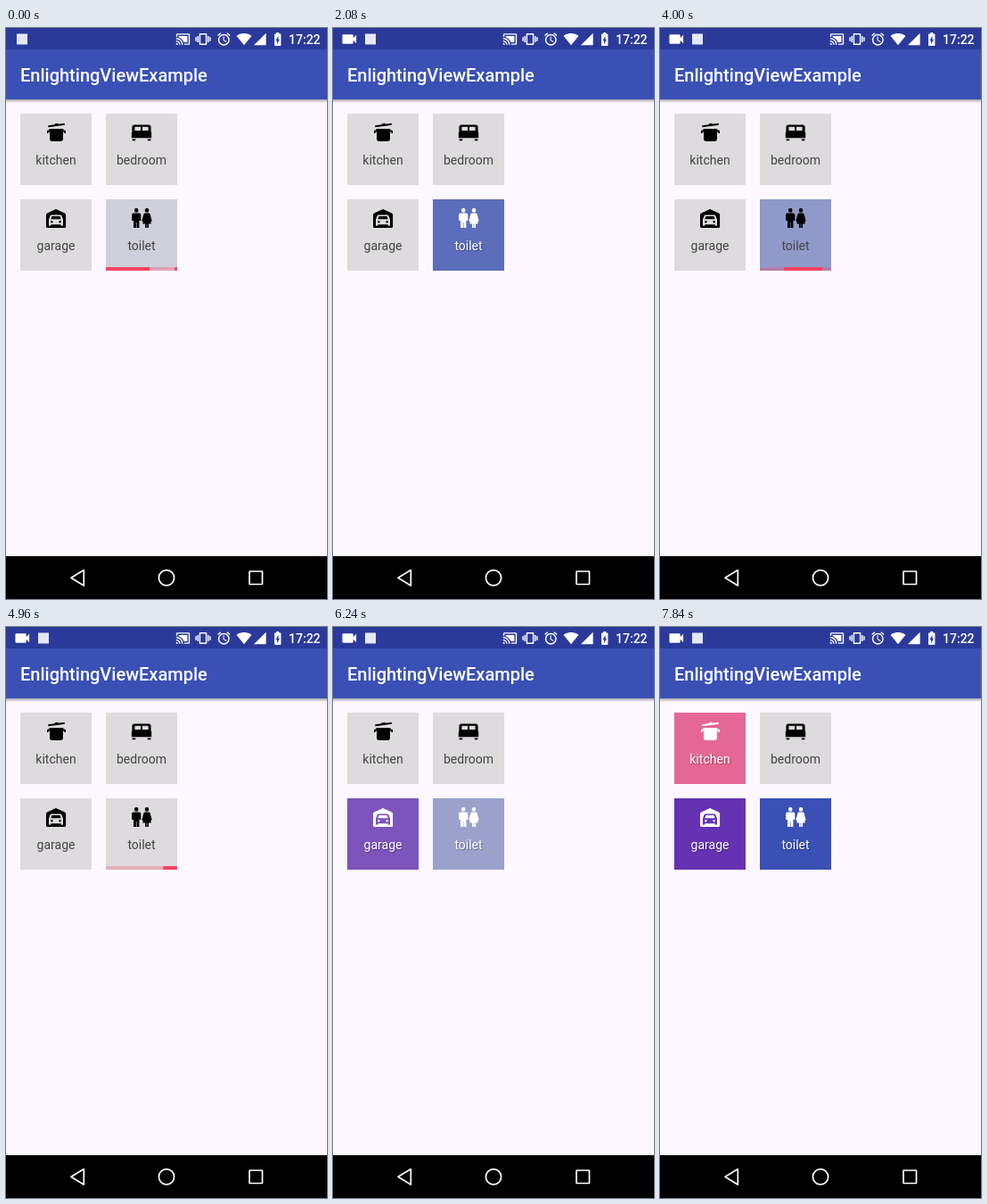
These frames come from a looping animation (360x640 px, 8 s). An HTML page:

```html
<!DOCTYPE html>
<html lang="en">
<head>
<meta charset="utf-8">
<title>EnlightingViewExample</title>
<style>
  html, body { margin: 0; width: 100%; height: 100%; overflow: hidden; background: #fdf8ff; }
  svg { display: block; width: 100vw; height: 100vh; }
  text { font-family: Roboto, sans-serif; }
  .medium { font-weight: 500; fill: #fff; }
  .label { font-size: 14px; text-anchor: middle; }
  .on { fill: #fff; }
  .on .label { text-shadow: 1px 1px 1px rgba(0, 0, 0, .35); }
  .off { fill: #000; }
  .off .label { fill: #444; }
</style>
</head>
<body>
<svg id="stage" viewBox="0 0 360 640">
  <defs>
    <linearGradient id="shade" x2="0" y2="1">
      <stop offset="0" stop-color="#000" stop-opacity=".34"/>
      <stop offset="1" stop-color="#000" stop-opacity="0"/>
    </linearGradient>
    <clipPath id="barClip"><rect y="76" width="80" height="4"/></clipPath>
  </defs>
  <rect width="360" height="640" fill="#fdf8ff"/>
  <rect y="80" width="360" height="4" fill="url(#shade)"/>
  <rect y="24" width="360" height="56" fill="#3a50b4"/>
  <rect width="360" height="24" fill="#2b3a9a"/>
  <text class="medium" x="16" y="60" font-size="20">EnlightingViewExample</text>
  <text class="medium" x="317" y="18" font-size="14">17:22</text>
  <g id="status" fill="#fff"></g>
  <rect id="badge" x="12" y="6.5" width="12" height="12" fill="#e4e7f6"/>
  <g id="tiles"></g>
  <rect y="592" width="360" height="48"/>
  <g fill="none" stroke="#fff" stroke-width="1.7" stroke-linejoin="round">
    <path d="M73 616.3L87.3 607.6V625z"/>
    <circle cx="180" cy="616.3" r="8.6"/>
    <rect x="273" y="609" width="14.5" height="14.5" rx=".6"/>
  </g>
</svg>
<script>
const LOOP = 8000, STEP = 160, FADE = 1500, BAR_CYCLE = 2000;
const GREY = [221, 219, 221];

const $ = id => document.getElementById(id);
function add(parent, tag, attrs) {
  const node = document.createElementNS(parent.namespaceURI, tag);
  for (const key in attrs) node.setAttribute(key, attrs[key]);
  return parent.appendChild(node);
}
const dot = (x, y, r) => `M${x - r} ${y}a${r} ${r} 0 1 0 ${2 * r} 0a${r} ${r} 0 1 0 ${-2 * r} 0z`;

// Status icons on a 24 unit grid: centre x, scale, path
const statusIcons = [
  [198.5, .7, 'M21 3H3c-1.1 0-2 .9-2 2v3h2V5h18v14h-7v2h7c1.1 0 2-.9 2-2V5c0-1.1-.9-2-2-2zM1 18v3h3c0-1.66-1.34-3-3-3zM1 14v2c2.76 0 5 2.24 5 5h2c0-3.87-3.13-7-7-7zM1 10v2c4.97 0 9 4.03 9 9h2c0-6.08-4.93-11-11-11zM19 7H5v1.63c3.96 1.28 7.09 4.41 8.37 8.37H19z'],
  [221, .72, 'M0 15h2V9H0zM3 17h2V7H3zM22 9v6h2V9zM19 17h2V7h-2zM16.5 3h-9C6.67 3 6 3.67 6 4.5v15c0 .83.67 1.5 1.5 1.5h9c.83 0 1.5-.67 1.5-1.5v-15c0-.83-.67-1.5-1.5-1.5zM16 19H8V5h8z'],
  [244.3, .72, 'M22 5.72l-4.6-3.86-1.29 1.53 4.6 3.86zM7.88 3.39L6.6 1.86 2 5.71l1.29 1.53zM12.5 8H11v6l4.75 2.85.75-1.23-4-2.37zM12 4a9 9 0 1 0 0 18a9 9 0 0 0 0-18zM12 20a7 7 0 1 1 0-14a7 7 0 0 1 0 14z'],
  [267, .72, 'M12 21.5L23.64 7C23.2 6.66 18.7 3 12 3S.8 6.66.36 7z'],
  [284.8, .68, 'M2 22h20V2z'],
  [304.7, .74, 'M15.67 4H14V2h-4v2H8.33C7.6 4 7 4.6 7 5.33v15.33C7 21.4 7.6 22 8.33 22h7.33c.74 0 1.34-.6 1.34-1.33V5.33C17 4.6 16.4 4 15.67 4zM11 20v-5.5H9L13 7v5.5h2z'],
  [18.3, .87, 'M17 10.5V7c0-.55-.45-1-1-1H4c-.55 0-1 .45-1 1v10c0 .55.45 1 1 1h12c.55 0 1-.45 1-1v-3.5l4 4v-11z']
].map(([x, k, d]) => add($('status'), 'path', {
  d, 'fill-rule': 'evenodd', transform: `translate(${x - 12 * k} ${12.5 - 12 * k}) scale(${k})`
}));
const camera = statusIcons[6];

const icons = {
  kitchen: 'M31.2 13.3L38.6 12.3l.3-1 3.4-.5.4.9 7-.9.2 1.9-18.5 2.6zM32.5 17h15.8v1.6h1.3q1.4 0 1.4 1.4v2h-1.6v-1.6H48V28q0 3-3 3H36q-3 0-3-3V20.4h-1.4V22H30v-2q0-1.4 1.4-1.4h1.1z',
  bedroom: 'M32 12.6h16q2.6 0 2.6 2.6v5.2l.6 1.2v5.6H28.8v-5.6l.6-1.2v-5.2q0-2.6 2.6-2.6zM33.2 14.8q-.8 0-.8.8v3.4h6.6v-4.2zM41 14.8v4.2h6.6v-3.4q0-.8-.8-.8zM29.6 28.4h3.6v1.8h-3.6zM46.8 28.4h3.6v1.8h-3.6z',
  garage: 'M29 17.4q0-1.4 1.3-2L40 11l9.8 4.4q1.3.6 1.3 2V30.5q0 1.5-1.5 1.5h-19q-1.6 0-1.6-1.5z' +
    'M35 17.5h10q1 0 1.4 1l1.6 4V29q0 .8-.8.8h-.8q-.8 0-.8-.8v-.8H34.4v.8q0 .8-.8.8h-.8q-.8 0-.8-.8v-6.5l1.6-4q.4-1 1.4-1zM35.5 19h9l1.2 3.3H34.3z' +
    dot(35.4, 25.2, 1.2) + dot(44.6, 25.2, 1.2),
  toilet: dot(34.2, 12.4, 2.3) + dot(46, 12.4, 2.3) +
    'M31 15.6h6.4q1.9 0 1.9 1.9V24h-1.9v8h-2.9v-6h-.6v6H31v-8h-1.9v-6.5q0-1.9 1.9-1.9z' +
    'M44 15.6h4q1.3 0 1.7 1.3l2 7.6-1.5.4.6 2.6H48V32h-1.7v-4.5h-.6V32H44v-4.5h-2.8l.6-2.6-1.5-.4 2-7.6q.4-1.3 1.7-1.3z'
};

// Each switch is [time, turned on]; fades are linear
const tiles = [
  ['kitchen', 16, 96, [233, 30, 99], [[6925, true]]],
  ['bedroom', 112, 96, GREY, []],
  ['garage', 16, 192, [102, 50, 180], [[5035, true]]],
  ['toilet', 112, 192, [58, 80, 180], [[-1380, false], [890, true], [3205, false], [5625, true]]]
].map(([name, x, y, color, switches]) => {
  const g = add($('tiles'), 'g', { transform: `translate(${x} ${y})` });
  const back = add(g, 'rect', { width: 80, height: 80 });
  add(g, 'path', { d: icons[name], 'fill-rule': 'evenodd' });
  add(g, 'text', { class: 'label', x: 40, y: 57 }).textContent = name;
  const bar = add(g, 'g', { fill: '#f94463', 'clip-path': 'url(#barClip)' });
  add(bar, 'rect', { y: 76, width: 80, height: 4, opacity: .3 });
  const runs = [0, 1].map(() => add(bar, 'rect', { y: 76, height: 4 }));
  return { g, back, bar, runs, color, switches };
});

// Chained cubic curve: flat list of points x, y, joined every third point
function curve(p, x) {
  let i = 0;
  while (i + 12 < p.length && x > p[i + 6]) i += 6;
  const at = (u, k) => {
    const v = 1 - u;
    return v * v * v * p[i + k] + 3 * v * v * u * p[i + 2 + k] +
      3 * v * u * u * p[i + 4 + k] + u * u * u * p[i + 6 + k];
  };
  let lo = 0, hi = 1;
  for (let n = 0; n < 24; n++) {
    const mid = (lo + hi) / 2;
    if (at(mid, 0) < x) lo = mid; else hi = mid;
  }
  return at(lo, 1);
}
function along(stops, f) {
  const s = f * (stops.length - 1), i = Math.min(Math.floor(s), stops.length - 2);
  return stops[i] + (stops[i + 1] - stops[i]) * (s - i);
}

// Indeterminate bar, in units of a 360 wide track centred on 0
const barRuns = [
  { from: -522.6, dist: 722.2, sizes: [.1, .827, .1],
    move: [0, 0, .07, 0, .13, 0, .2, 0, .3958, 0, .4748, .2068, .5917, .4171, .7152, .6394, .8163, .9746, 1, 1],
    size: [0, 0, .12, 0, .24, 0, .3665, 0, .4725, .0624, .6154, .5, .6833, .5, .7548, .5, .7573, .8145, 1, 1] },
  { from: -197.6, dist: 620.2, sizes: [.1, .571, .91, .1],
    move: [0, 0, .0375, 0, .1288, .0895, .25, .2186, .3224, .2956, .4367, .4176, .4833, .4898, .69, .8097, .7933, .95, 1, 1],
    size: [0, 0, .0683, .0199, .1922, .1586, .3333, .3493, .3841, .4148, .5495, .6814, .6667, .6828, .7526, .6818, .7373, .8789, 1, 1] }
];
function drawBar(rects, phase) {
  barRuns.forEach((run, i) => {
    const mid = run.from + run.dist * curve(run.move, phase);
    const width = 288 * along(run.sizes, curve(run.size, phase));
    rects[i].setAttribute('x', (mid - width / 2 + 180) * 80 / 360);
    rects[i].setAttribute('width', width * 80 / 360);
  });
}

function draw(t) {
  const recording = t >= STEP;
  camera.style.display = recording ? '' : 'none';
  $('badge').setAttribute('x', recording ? 36 : 12);
  for (const tile of tiles) {
    const last = tile.switches.filter(s => s[0] <= t).pop();
    const on = !!last && last[1];
    let level = 0;
    if (last) {
      const f = Math.min((t - last[0]) / FADE, 1);
      level = on ? f : 1 - f;
    }
    const mix = GREY.map((v, i) => Math.round(v + (tile.color[i] - v) * level));
    tile.back.setAttribute('fill', `rgb(${mix})`);
    tile.g.setAttribute('class', on ? 'on' : 'off');
    const busy = last && !on;
    tile.bar.style.display = busy ? '' : 'none';
    if (busy) drawBar(tile.runs, (t - last[0]) % BAR_CYCLE / BAR_CYCLE);
  }
}

const start = performance.now();
function tick() {
  const t = (performance.now() - start) % LOOP;
  draw(Math.floor(t / STEP) * STEP);
  requestAnimationFrame(tick);
}
tick();
</script>
</body>
</html>
```
